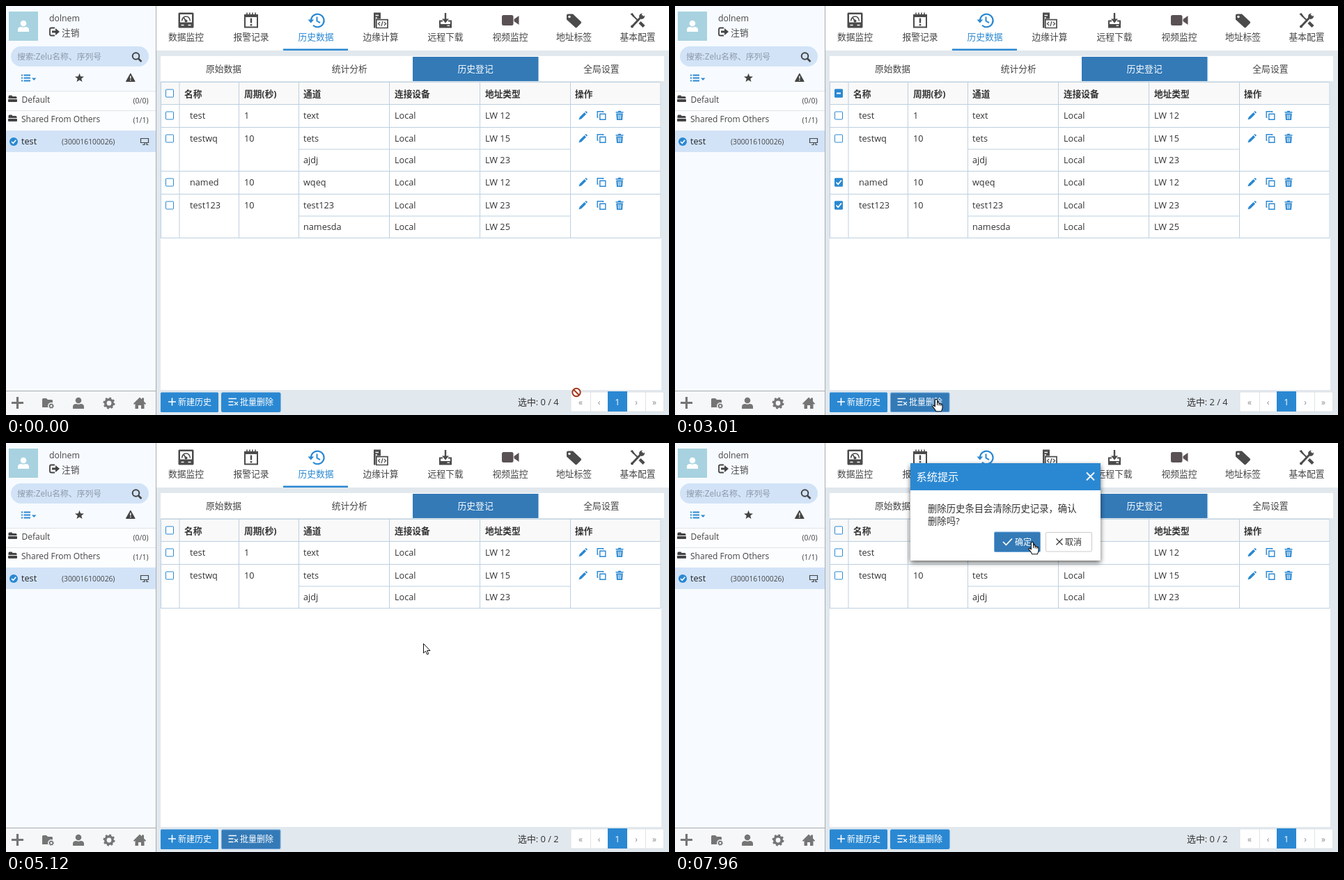
An HTML page that plays this animation: 952x588 px, repeating every 8 s.

```html
<!DOCTYPE html>
<html lang="zh-CN">
<head>
<meta charset="utf-8">
<title>历史登记</title>
<style>
html, body { margin: 0; width: 100%; height: 100%; overflow: hidden; background: #fff; }
svg { display: block; width: 952px; height: 588px; font-family: 'Open Sans', 'Noto Sans CJK SC', 'Noto Sans CJK', sans-serif; }
text { white-space: pre; }
</style>
</head>
<body>
<svg id="stage" viewBox="0 0 952 588" xmlns="http://www.w3.org/2000/svg"></svg>
<script>
const BLUE = '#2a88d2', DARK = '#337ab7', INK = '#333', ICON = '#4b4b4b', LINE = '#bdd0e0';
const LOOP = 8000;
const stage = document.getElementById('stage');

const rect = (x, y, w, h, fill, extra = '') =>
  `<rect x="${x}" y="${y}" width="${w}" height="${h}" fill="${fill}" ${extra}/>`;
const fillPath = (d, fill, extra = '') => `<path d="${d}" fill="${fill}" ${extra}/>`;
const linePath = (d, color, width = 1, extra = '') =>
  `<path d="${d}" fill="none" stroke="${color}" stroke-width="${width}" ${extra}/>`;
const disc = (x, y, r, fill, extra = '') => `<circle cx="${x}" cy="${y}" r="${r}" fill="${fill}" ${extra}/>`;
const text = (x, y, str, size = 12.7, fill = INK, extra = '') =>
  `<text x="${x}" y="${y}" font-size="${size}" fill="${fill}" ${extra}>${str}</text>`;
const group = (body, x = 0, y = 0, extra = '') => `<g transform="translate(${x} ${y})" ${extra}>${body}</g>`;
const MID = 'text-anchor="middle"', BOLD = 'font-weight="700"';

// Icons are drawn around their own centre.
const person = (fill, s = 1) => `<g transform="scale(${s})">` +
  disc(0, -4, 4.3, fill) + fillPath('M-8 8V5Q-8 1-3 1Q0 2.5 3 1Q8 1 8 5V8Z', fill) + '</g>';
const gear = (fill, r) => {
  const tooth = Math.PI * r / 8;
  return `<circle r="${r * .72}" fill="none" stroke="${fill}" stroke-width="${r * .5}"/>` +
    `<circle r="${r}" fill="none" stroke="${fill}" stroke-width="${r * .36}" stroke-dasharray="${tooth}"/>`;
};
const star = () => {
  let d = '';
  for (let i = 0; i < 10; i++) {
    const r = i % 2 ? 2.9 : 6.8, a = Math.PI * i / 5;
    d += `${i ? 'L' : 'M'}${(r * Math.sin(a)).toFixed(2)} ${(-r * Math.cos(a)).toFixed(2)}`;
  }
  return fillPath(d + 'Z', '#444');
};
const folder = fillPath('M-6-3Q-6-5-4.5-5H-1L0-3.5H4.5Q6-3.5 6-2V-.5H-6Z', '#444') + rect(-6.5, .5, 13, 4, '#444', 'rx="1"');
const pencil = fillPath('M-6 6L-4.8 2.2L2-4.6L4.6-2L-2.2 4.8ZM2.8-5.4L3.7-6.2Q4.6-6.6 5.4-5.8L6-5.2Q6.6-4.2 5.9-3.5L5.3-2.9Z', BLUE);
const copy = linePath('M-2.2-2.2H5.8V5.8H-2.2ZM-4.5 2.5H-5.8V-5.8H2.5V-4.5', BLUE, 1.4);
const trash = fillPath('M-5.5-5.5H-2V-6.7H2V-5.5H5.5V-4H-5.5ZM-4.8-3H4.8L4 6.5H-4Z', BLUE) +
  linePath('M-2-1.5L-1.6 5M2-1.5L1.6 5M0-1.5V5', '#fff', .9);
const cross = (r, color, w) => linePath(`M${-r} ${-r}L${r} ${r}M${r} ${-r}L${-r} ${r}`, color, w);

const menuIcons = [
  rect(-11, -11, 22, 22, ICON, 'rx="1.5"') + rect(-8.5, -8.5, 17, 11.5, '#fff') +
    linePath('M-6 1Q-5-5.5 0-5.5T6 1', ICON, 1.6) + linePath('M0 1.5L-3-3.5', ICON, 1.6) + disc(0, 1, 2, ICON) +
    linePath('M-7 7H-3M3 7H7', '#fff', 1.5),
  linePath('M-9-7.5H9V10H-9Z', ICON, 2) + linePath('M-10-6H10', ICON, 3) +
    linePath('M-6-11V-5M-2-11V-5M2-11V-5M6-11V-5', ICON, 1.6) + linePath('M0-3V4', ICON, 2.4) + rect(-1.3, 5.5, 2.6, 2.4, ICON),
  linePath('M-8.5 0A9.3 9.3 0 1 1-5.5 7.3', BLUE, 2.2, 'transform="translate(1.5 0)"') +
    fillPath('M-11.5-1H-2.8L-7.2 4Z', BLUE) + linePath('M1.5-5V1L6 3.7', BLUE, 2),
  rect(-10, -11, 10, 22, ICON) + linePath('M-7.5-7H-3M-7.5-3.5H-5', '#fff', 1.3) +
    rect(-7.5, -2, 18.5, 14, '#fff') + linePath('M-6.2-.8H10V11H-6.2Z', ICON, 1.7) +
    linePath('M-1 2.5L-3.5 5L-1 7.5M5 2.5L7.5 5L5 7.5M3 1.5L1 8.5', ICON, 1.2),
  linePath('M-4 1H-8V10H8V1H4', ICON, 2) + rect(-8, 5.5, 16, 4.5, ICON) +
    linePath('M0-10.5V1', ICON, 2.4) + fillPath('M-5-2H5L0 4Z', ICON) + linePath('M2.5 7.8H6', '#fff', 1.3),
  rect(-12, -7.5, 16.5, 15, '#5a5155', 'rx="2.5"') + fillPath('M5.5-1.5L12.5-6.5V6.5L5.5 1.5Z', '#5a5155'),
  fillPath('M-10.5-7Q-10.5-9-8.5-9H-1.5L10.2 2Q11.2 3.2 10 4.4L4.3 10.2Q3 11.4 1.8 10.2L-10.5-1Z', ICON) + disc(-6.5, -5, 1.7, '#fff'),
  linePath('M-8 9L7-7', ICON, 3) + linePath('M-7-7L1 1', ICON, 2) + linePath('M3 3L9 9', ICON, 4.4) +
    fillPath('M-10.5-9L-7.5-10.5L-4.5-6L-6-4.5ZM2-5Q2-9.5 7-10L5-7L7-5L10-7Q10.5-2 5-1.5Z', ICON) + disc(-8, 9, 2, ICON)
];
const menu = ['数据监控', '报警记录', '历史数据', '边缘计算', '远程下载', '视频监控', '地址标签', '基本配置'];
const menuX = [258.5, 352, 445, 538, 631, 724, 815.5, 907];

function sidebar() {
  const grey = '#757575';
  return rect(0, 0, 215, 588, '#f7fbff') +
    rect(4, 8, 42, 42, '#a8d2e0') + group(person('#fff'), 25, 29) +
    text(62, 22, 'dolnem', 12.3, '#444') +
    group(linePath('M1-5.5H-4Q-6-5.5-6-3.5V3.5Q-6 5.5-4 5.5H1', '#444', 1.8) +
      fillPath('M-3-1.5H2V-5L8 0L2 5V1.5H-3Z', '#444'), 69, 37) +
    text(80, 42.5, '注销', 12.7, '#444') +
    rect(7, 58, 198, 29, '#d2e3f7', 'rx="14.5"') + text(16, 77, '搜索:Zelu名称、序列号', 11.8, '#8b98a8') +
    disc(186.5, 72, 4.8, 'none', 'stroke="#444" stroke-width="2"') + linePath('M190 75.5L194.5 80', '#444', 2.6) +
    linePath('M22 99.5H24M22 103.5H24M22 107.5H24M25.5 99.5H35M25.5 103.5H35M25.5 107.5H35', BLUE, 1.9) +
    fillPath('M37 103.5H43.5L40.2 107Z', BLUE) + group(star(), 105.5, 103.5) +
    fillPath('M178.8 97L185.2 108.5H172.4Z', '#444', 'stroke="#444" stroke-linejoin="round"') +
    linePath('M178.8 100.5V104.5M178.8 105.8V107.3', '#fff', 1.4) +
    rect(0, 122, 215, 57, '#fcfdfe') + linePath('M0 122.5H215M0 150.5H215', '#e1e5e9') +
    group(folder, 9.5, 133.5) + text(22.5, 139, 'Default', 12, '#444') + text(182.5, 140, '(0/0)', 10.5, '#444') +
    group(folder, 9.5, 161.5) + text(22, 167, 'Shared From Others', 12, '#444') + text(182.5, 168, '(1/1)', 10.5, '#444') +
    rect(0, 179, 215, 31, '#d2e3f8') + disc(11, 195, 6, BLUE) + linePath('M8 195L10.3 197.3L14.3 192.8', '#fff', 1.6) +
    text(22, 199, 'test', 12.7, '#222') + text(80, 199, '(300016100026)', 10.25, '#444') +
    linePath('M193.5 190.5H204.5V196.5H193.5ZM199 197V200M196 199.5H199M202 196.5V199.5H204.5', '#444', 1.2) +
    rect(0, 553, 215, 35, '#f5f7f9') + linePath('M0 553.5H215', '#a9adb1') +
    linePath('M8 570.5H25M16.5 562V579', grey, 3.2) +
    group(fillPath('M-8-5.5Q-8-7-6.5-7H-2L0-5H5.5Q7-5 7-3.5V6H-8Z', grey) + group(disc(0, 0, 5, '#f5f7f9') + gear(grey, 3.2), 5, 4), 60, 571) +
    group(person(grey), 104, 571) + group(gear(grey, 7.2), 148, 571) +
    group(fillPath('M-9 .5L0-8.5L3-5.5V-7.5H6V-2.5L9 .5L8 2L6.5 .8V8H2V3H-2V8H-6.5V.8L-8 2Z', grey), 192, 571) +
    rect(215, 0, 1, 588, '#a9adb1');
}

function frame() {
  let s = rect(216, 0, 736, 588, '#e1e8ee') + rect(216, 0, 736, 64, '#fff');
  menu.forEach((name, i) => {
    s += group(menuIcons[i], menuX[i], 20.5) + text(menuX[i], 49, name, 12.8, i === 2 ? BLUE : '#444', MID);
  });
  s += rect(398, 61.5, 93, 2.5, BLUE) + rect(222, 72, 723, 36, '#fff') + rect(584, 73, 180.5, 35, DARK);
  ['原始数据', '统计分析', '历史登记', '全局设置'].forEach((name, i) => {
    s += text(312.5 + 180.8 * i, 95, name, 12.8, i === 2 ? '#fff' : '#444', MID + (i === 2 ? ' font-weight="500"' : ''));
  });
  s += rect(222, 109, 719, 443, '#fff') + rect(222, 109, 719, 32, '#f9f9f9');
  const heads = ['名称', '周期(秒)', '通道', '连接设备', '地址类型', '操作'];
  [256, 342, 427, 558, 688, 817].forEach((x, i) => s += text(x, 130.5, heads[i], 12.7, INK, BOLD));
  s += grid(109.5, 141.5);
  s += rect(222, 555.5, 83, 28.5, BLUE, 'rx="1.5"') + linePath('M233 569H244M238.5 563.5V574.5', '#fff', 1.6) +
    text(247, 574, '新建历史', 12, '#fff', 'font-weight="500"');
  s += rect(811, 555, 133.5, 28, '#fff', 'stroke="#dcdfe2" stroke-width=".8"') +
    linePath('M839.5 555V583M918.5 555V583', '#e0e3e6') + rect(864, 554, 28, 29, BLUE);
  ['«', '‹', '1', '›', '»'].forEach((c, i) =>
    s += text([825, 851.5, 878, 905, 931][i], 573.5, c, i === 2 ? 12.7 : 12, i === 2 ? '#fff' : '#888', MID));
  return s;
}

const COLS = [222.5, 249, 334.5, 420.5, 550.5, 680.5, 810.5, 940];
const grid = (top, bottom) =>
  linePath(`M222 ${top}H940M222 ${bottom}H940` + COLS.map(x => `M${x} ${top}V${bottom}`).join(''), LINE);

const box = (id, y) => rect(229.5, y - 5.5, 11, 11, '#fff', `stroke="${BLUE}" rx="1"`) +
  `<g id="${id}">` + rect(229, y - 6, 12, 12, BLUE, 'rx="1"') +
  (id === 'mark0' ? rect(232, y - 1, 6, 2, '#fff') : linePath(`M231.5 ${y}L234.2 ${y + 2.8}L239 ${y - 3}`, '#fff', 1.8)) + '</g>';

const rows = [
  { top: 141.5, end: 174.5, name: 'test', period: 1, lines: [['text', 12]] },
  { top: 174.5, end: 237.5, name: 'testwq', period: 10, lines: [['tets', 15], ['ajdj', 23]] },
  { top: 237.5, end: 270.5, name: 'named', period: 10, lines: [['wqeq', 12]] },
  { top: 270.5, end: 333.5, name: 'test123', period: 10, lines: [['test123', 23], ['namesda', 25]] }
];

function row(r, i) {
  const mid = r.top + 16;
  let s = grid(r.top, r.end) + box('mark' + (i + 1), mid) + text(264, mid + 4, r.name) + text(342, mid + 4, r.period);
  r.lines.forEach(([channel, address], k) => {
    const y = mid + 4 + 31.7 * k;
    s += text(427, y, channel) + text(558, y, 'Local') + text(688, y, 'LW ' + address);
    if (k) s += linePath(`M420.5 ${r.top + 31.5}H810.5`, LINE);
  });
  if (i === 1) s += rect(869.5, 181, 22.5, 19.5, '#fff', 'id="ring" stroke="#8fbbe6" stroke-width="1.2" rx="1"');
  return `<g id="row${i}">` + s + group(pencil, 828.5, mid) + group(copy, 855, mid) + group(trash, 881, mid) + '</g>';
}

function dialog(id, lines) {
  const lift = lines.length === 1 ? -18 : 0;
  const buttons = rect(458.5, 128, 66, 28.5, DARK, 'stroke="#6fa5da" rx="1.5"') +
    rect(459, 129, 65, 2.5, '#28659a', `id="${id}Press"`) +
    linePath('M471 142L475.5 146.5L484 137.5', '#fff', 1.7) + text(488, 147, '确定', 12, '#fff', 'font-weight="500"') +
    rect(532.5, 128.5, 66, 27.5, '#fff', 'stroke="#ccc" rx="1.5"') + group(cross(4.5, INK, 1.2), 552, 142) + text(560, 147, '取消', 12);
  return `<g id="${id}">` + rect(338, 29, 273, 140 + lift, '#fff', 'filter="url(#shade)"') +
    rect(338, 29, 273, 39, BLUE) + text(346.5, 54, '系统提示', 15.2, '#fff', 'font-weight="500"') +
    group(cross(5.5, '#fff', 1.9), 596.5, 48) +
    lines.map((line, i) => text(363, 99 + 18.3 * i, line, 13.35)).join('') + group(buttons, 0, lift) + '</g>';
}

const cursors = {
  stop: disc(0, 0, 5.7, '#fff', 'fill-opacity=".75" stroke="#a5381c" stroke-width="2"') + linePath('M-4-4L4 4', '#a5381c', 2),
  arrow: fillPath('M.5 .5V14L3.6 11.2L5.7 16L7.8 15.1L5.7 10.5H10Z', '#fff', 'stroke="#111" stroke-width="1"'),
  hand: fillPath('M-1.6 1.8Q-1.6 .4 0 .4T1.6 1.8V6.5Q3-.0 4.2 7Q5.8 5.6 6.8 7.8Q8.8 6.8 9 9.3V12.5Q8.8 15.5 7.3 17.8H-.2Q-1.6 14.8-4.8 11.2Q-5.4 9.5-4 9.1Q-2.8 9.1-1.6 11Z',
    '#fff', 'stroke="#111" stroke-width="1.1" stroke-linejoin="round"') + linePath('M1.6 6.5V9M4.2 7V9.5M6.8 7.8V10', '#111', 1)
};

let bars = '';
for (let i = 0; i < 5; i++) bars += rect(460.5 + 7.6 * i, 260, 6, 13, BLUE, `id="bar${i}"`);

stage.innerHTML = '<defs><filter id="shade" x="-10%" y="-15%" width="120%" height="135%">' +
  '<feDropShadow dx="0" dy="3" stdDeviation="3.5" flood-color="#000" flood-opacity=".6"/></filter></defs>' +
  sidebar() + frame() + box('mark0', 125.5) + rows.map(row).join('') +
  rect(309.5, 556, 84.5, 27.5, BLUE, 'id="batch" rx="1.5"') +
  linePath('M319.5 564.5H331M319.5 569H326.5M319.5 573.5H326.5', '#fff', 1.6) + group(cross(2.4, '#fff', 1.3), 330.5, 571.5) +
  text(336, 574, '批量删除', 12, '#fff', 'font-weight="500"') +
  text(735, 574, '', 12.9, INK, 'id="count"') + `<g id="loader">${bars}</g>` +
  dialog('ask', ['确认删除选中的历史条目吗?']) + dialog('warn', ['删除历史条目会清除历史记录，确认', '删除吗?']) +
  Object.entries(cursors).map(([k, body]) => `<g id="${k}">${body}</g>`).join('');

const el = {};
stage.querySelectorAll('[id]').forEach(n => el[n.id] = n);
const show = (id, amount) => {
  el[id].style.display = amount ? '' : 'none';
  el[id].style.opacity = Number(amount);
};

// Pointer moves: start, last step, step count, end x, end y, shape at the end.
const moves = [
  [70, 620, 8, 237, 250, 'hand'], [935, 1020, 2, 237, 293, 'hand'], [1160, 1240, 2, 235, 291, 'hand'],
  [1390, 1390, 1, 234, 289, 'hand'], [1700, 2390, 10, 384, 566, 'hand'], [2470, 2630, 3, 378, 557, 'hand'],
  [2940, 3010, 2, 375, 565, 'hand'], [3260, 3560, 5, 573, 335, 'arrow'], [3730, 4040, 5, 500, 124, 'hand'],
  [4570, 4570, 1, 500, 124, 'arrow'], [4880, 5120, 4, 599, 288, 'arrow'], [5340, 6120, 11, 883, 192, 'hand'],
  [6200, 6360, 3, 889, 156, 'hand'], [6440, 6670, 4, 882, 190, 'hand'], [6970, 6970, 1, 880, 188, 'hand'],
  [7300, 7300, 1, 879, 188, 'arrow'], [7500, 7720, 4, 602, 195, 'arrow'], [7820, 7960, 3, 513, 142, 'hand']
];

function pointer(t) {
  let x = 819, y = 555.5, shape = 'stop';
  for (const [from, to, n, ex, ey, end] of moves) {
    if (t < from) break;
    const k = n === 1 ? 1 : Math.min(n, Math.floor((t - from) / (to - from) * (n - 1) + 1e-6) + 1);
    const p = k / n, e = p * p * (3 - 2 * p);
    const near = Math.hypot(ex - x, ey - y) < 45;
    shape = k === n || near ? end : 'arrow';
    x += (ex - x) * e;
    y += (ey - y) * e;
  }
  return { x, y, shape };
}

function draw(t) {
  const within = (a, b) => t >= a && t < b;
  const fade = (a, b) => within(a, b) && (t < a + 70 ? .5 : 1);
  const removed = t >= 4800;
  show('row2', !removed);
  show('row3', !removed);
  show('mark0', within(850, 4800));
  show('mark1', false);
  show('mark2', false);
  show('mark3', fade(850, 4800));
  show('mark4', fade(1620, 4800));
  const picked = removed || t < 850 ? 0 : t < 1620 ? 1 : 2;
  el.count.textContent = `选中: ${picked} / ${removed ? 2 : 4}`;

  const lit = within(2390, 3180) || within(4570, 6970);
  el.batch.setAttribute('fill', lit ? DARK : BLUE);
  el.batch.setAttribute('stroke', lit && t >= 2940 ? '#6fa5da' : lit ? DARK : BLUE);
  show('ring', within(6970, 7500));

  show('ask', fade(3180, 4570));
  show('askPress', within(4420, 4570));
  show('warn', fade(7500, LOOP));
  show('warnPress', false);

  show('loader', within(4570, 4800));
  const peak = t < 4650 ? 2 : 3;
  for (let i = 0; i < 5; i++) show('bar' + i, [1, .6, .3, .3][Math.abs(i - peak)]);

  const p = pointer(t);
  for (const k in cursors) show(k, k === p.shape);
  el[p.shape].setAttribute('transform', `translate(${p.x.toFixed(1)} ${p.y.toFixed(1)})`);
}

const start = performance.now();
function tick() {
  draw((performance.now() - start) % LOOP);
  requestAnimationFrame(tick);
}
tick();
</script>
</body>
</html>
```
